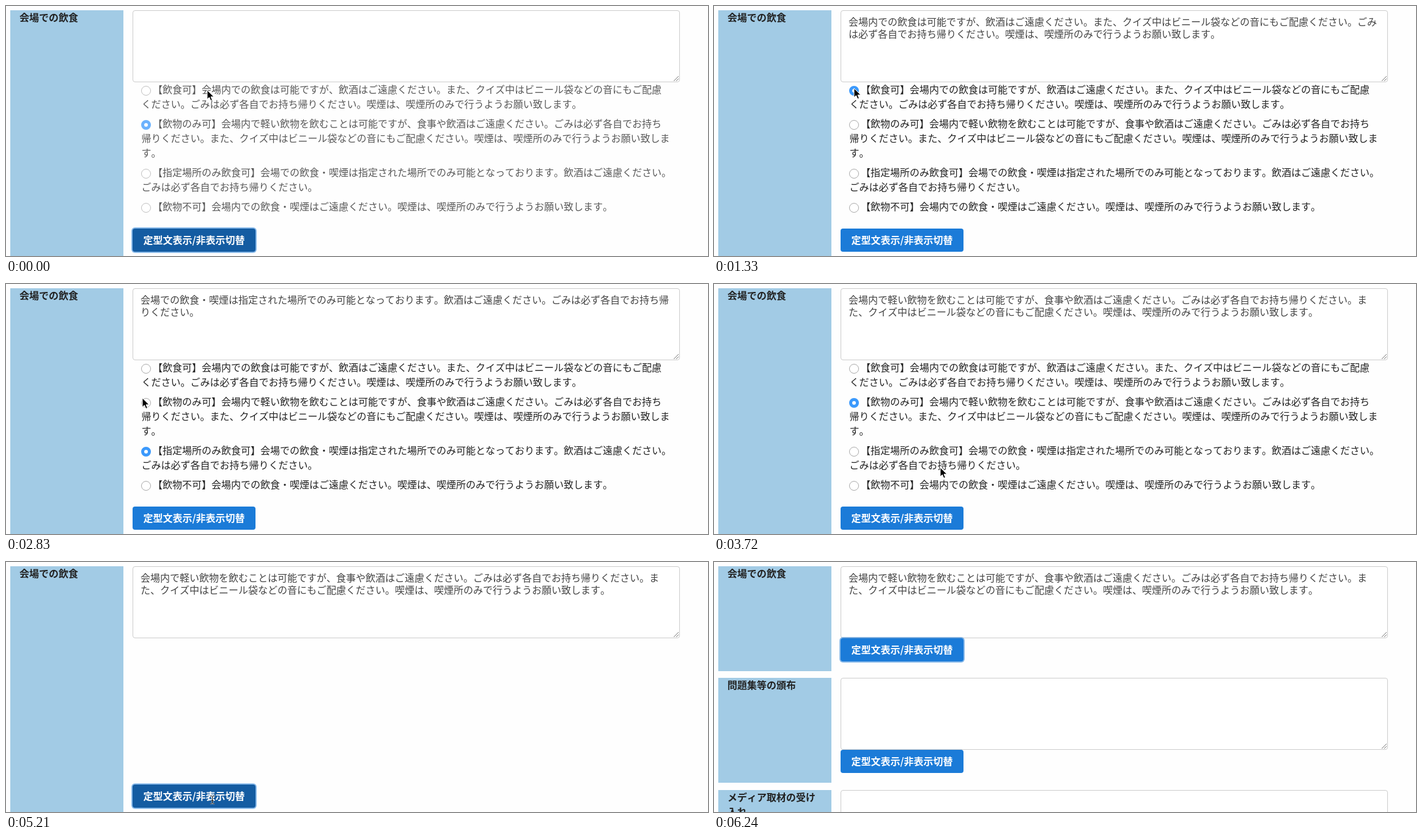
These frames come from a looping animation (1148 by 410 pixels, 6.99 s). An HTML page:

```html
<!DOCTYPE html>
<html lang="ja">
<head>
<meta charset="utf-8">
<style>
html, body { margin: 0; width: 100%; height: 100%; overflow: hidden; background: #fefefe; }
#stage { position: absolute; left: 0; top: 0; width: 1148px; height: 410px; overflow: hidden;
  font: 16px/24px "Noto Sans CJK JP", "Noto Sans CJK", sans-serif; font-kerning: none;
  text-spacing-trim: space-all; color: #222; }
#stage div, #stage svg { position: absolute; box-sizing: border-box; white-space: pre; }
.side { left: 7px; width: 185px; background: #a2cbe5; }
.head { font-weight: bold; }
.area { left: 207px; width: 895px; height: 118px; border: 1px solid #ccc; border-radius: 4px; background: #fff; }
.area svg { right: 0; bottom: 0; }
.field { color: #444; }
.button { left: 207px; width: 201px; height: 38px; border-radius: 4px; background: #1b7bd8;
  color: #fff; font-weight: bold; line-height: 36px; text-align: center; }
.radio { left: 221px; width: 16px; height: 16px; border-radius: 50%; border: 1px solid #aaa; background: #fff; }
.radio.on { border: 5px solid #3b99fc; }
</style>
</head>
<body>
<div id="stage"></div>
<script>
const LOOP = 6990, STEP = 148.8;
const stage = document.getElementById('stage');

function add(cls, parent = stage, top = 0, text = '') {
  const el = document.createElement('div');
  el.className = cls;
  el.style.top = top + 'px';
  el.textContent = text;
  parent.append(el);
  return el;
}

function line(text, x, middle, parent, cls = '') {
  const el = add(cls, parent, middle - 13, text);
  el.style.left = x + 'px';
  return el;
}

function row(top, parent, ...heads) {
  const side = add('side', parent, top);
  side.style.height = '172px';
  heads.forEach((text, i) => line(text, 22, top + 12 + 24 * i, parent, 'head'));
  const area = add('area', parent, top);
  area.innerHTML = '<svg width="10" height="10"><path d="M1 9L9 1M5 9L9 5" stroke="#777"/></svg>';
  const button = add('button', parent, top + 118, '定型文表示/非表示切替');
  return { side, button };
}

const main = row(7, stage, '会場での飲食');
const rest = add('');
row(190, rest, '問題集等の頒布');
row(374, rest, 'メディア取材の受け', '入れ');

const field = [26, 46].map(y => line('', 220, y, stage, 'field'));
const filled = [
  ['会場内での飲食は可能ですが、飲酒はご遠慮ください。また、クイズ中はビニール袋などの音にもご配慮ください。ごみ',
   'は必ず各自でお持ち帰りください。喫煙は、喫煙所のみで行うようお願い致します。'],
  ['会場内で軽い飲物を飲むことは可能ですが、食事や飲酒はご遠慮ください。ごみは必ず各自でお持ち帰りください。ま',
   'た、クイズ中はビニール袋などの音にもご配慮ください。喫煙は、喫煙所のみで行うようお願い致します。'],
  ['会場での飲食・喫煙は指定された場所でのみ可能となっております。飲酒はご遠慮ください。ごみは必ず各自でお持ち帰',
   'りください。']
];

const options = add('');
const radios = [
  [137, '【飲食可】会場内での飲食は可能ですが、飲酒はご遠慮ください。また、クイズ中はビニール袋などの音にもご配慮',
    'ください。ごみは必ず各自でお持ち帰りください。喫煙は、喫煙所のみで行うようお願い致します。'],
  [193, '【飲物のみ可】会場内で軽い飲物を飲むことは可能ですが、食事や飲酒はご遠慮ください。ごみは必ず各自でお持ち',
    '帰りください。また、クイズ中はビニール袋などの音にもご配慮ください。喫煙は、喫煙所のみで行うようお願い致しま', 'す。'],
  [273, '【指定場所のみ飲食可】会場での飲食・喫煙は指定された場所でのみ可能となっております。飲酒はご遠慮ください。',
    'ごみは必ず各自でお持ち帰りください。'],
  [329, '【飲物不可】会場内での飲食・喫煙はご遠慮ください。喫煙は、喫煙所のみで行うようお願い致します。']
].map(([y, ...lines]) => {
  lines.forEach((text, i) => line(text, i ? 221.5 : 240, y + 24 * i, options));
  return add('radio', options, y - 6);
});

stage.insertAdjacentHTML('beforeend', `<svg id="mouse" width="1" height="1" style="left:0;top:0;overflow:visible">
  <path id="arrow" d="M0 0V15L3.4 11.8 5.9 17.4 8.4 16.3 6 10.9H11Z" stroke="#fff" fill="#000"/>
  <g id="beam" fill="none"><path id="bar" d="M-3 -6.5Q0 -6.5 .5 -5Q1 -6.5 4 -6.5M.5 -5V5M-3 6.5Q0 6.5 .5 5Q1 6.5 4 6.5M-1.5 1.5H2.5"
    stroke="#fff" stroke-opacity=".5" stroke-width="2"/><use href="#bar"/>
    <path d="M-3 -6.5Q0 -6.5 .5 -5Q1 -6.5 4 -6.5M.5 -5V5M-3 6.5Q0 6.5 .5 5Q1 6.5 4 6.5M-1.5 1.5H2.5" stroke="#111"/></g></svg>`);
const [mouse, arrow, beam] = ['mouse', 'arrow', 'beam'].map(id => document.getElementById(id));

// step, x, y
const path = [[0, 329, 138], [8, 229, 135], [9, 229, 135], [14, 226, 276], [17, 226, 276], [19, 223, 187],
  [21, 224, 189], [24, 224, 189], [25, 370, 301], [26, 435, 345], [27, 455, 374], [28, 385, 388],
  [29, 336, 386], [34, 336, 386], [35, 337, 390], [38, 337, 390], [41, 1050, 386], [48, 1050, 386]];

function pointAt(n) {
  const i = path.findIndex(p => p[0] > n);
  const [a, b] = [path[i - 1], path[i]];
  const k = (n - a[0]) / (b[0] - a[0]), e = k * k * (3 - 2 * k);
  return [a[1] + (b[1] - a[1]) * e, a[2] + (b[2] - a[2]) * e];
}

// how far the button has turned to its hover colour
function hoverAt(n) {
  if (n < 2) return n ? 0.4 : 1;
  if (n < 28) return 0;
  if (n === 28) return 0.5;
  return n < 39 ? 1 : n === 39 ? 0.4 : 0;
}

function draw(t) {
  const n = Math.floor((t % LOOP + 12) / STEP);
  const open = n < 36;
  const picked = n < 9 ? 1 : n < 16 ? 0 : n < 22 ? 2 : 1;

  options.style.opacity = n === 0 ? 0.75 : n < 33 ? 1 : n === 33 ? 0.86 : n === 34 ? 0.35 : 0;
  radios.forEach((r, i) => r.classList.toggle('on', i === picked));
  field.forEach((el, i) => el.textContent = n < 9 ? '' : filled[picked][i]);

  main.side.style.height = open ? '403px' : '172px';
  rest.style.display = open ? 'none' : '';
  const h = hoverAt(n), mix = (a, b) => Math.round(a + (b - a) * h);
  Object.assign(main.button.style, {
    top: open ? '365px' : '125px',
    background: `rgb(${mix(27, 20)},${mix(123, 92)},${mix(216, 162)})`,
    boxShadow: n < 9 || n >= 33 ? '0 0 0 2px rgba(27,123,216,.5)' : 'none'
  });

  const [x, y] = pointAt(n);
  mouse.style.transform = `translate(${Math.round(x)}px,${Math.round(y)}px)`;
  mouse.style.display = n < 42 ? '' : 'none';
  arrow.style.display = n < 35 ? '' : 'none';
  beam.style.display = n < 35 ? 'none' : '';
}

const start = performance.now();
function tick() {
  draw(performance.now() - start);
  requestAnimationFrame(tick);
}
tick();
</script>
</body>
</html>
```
